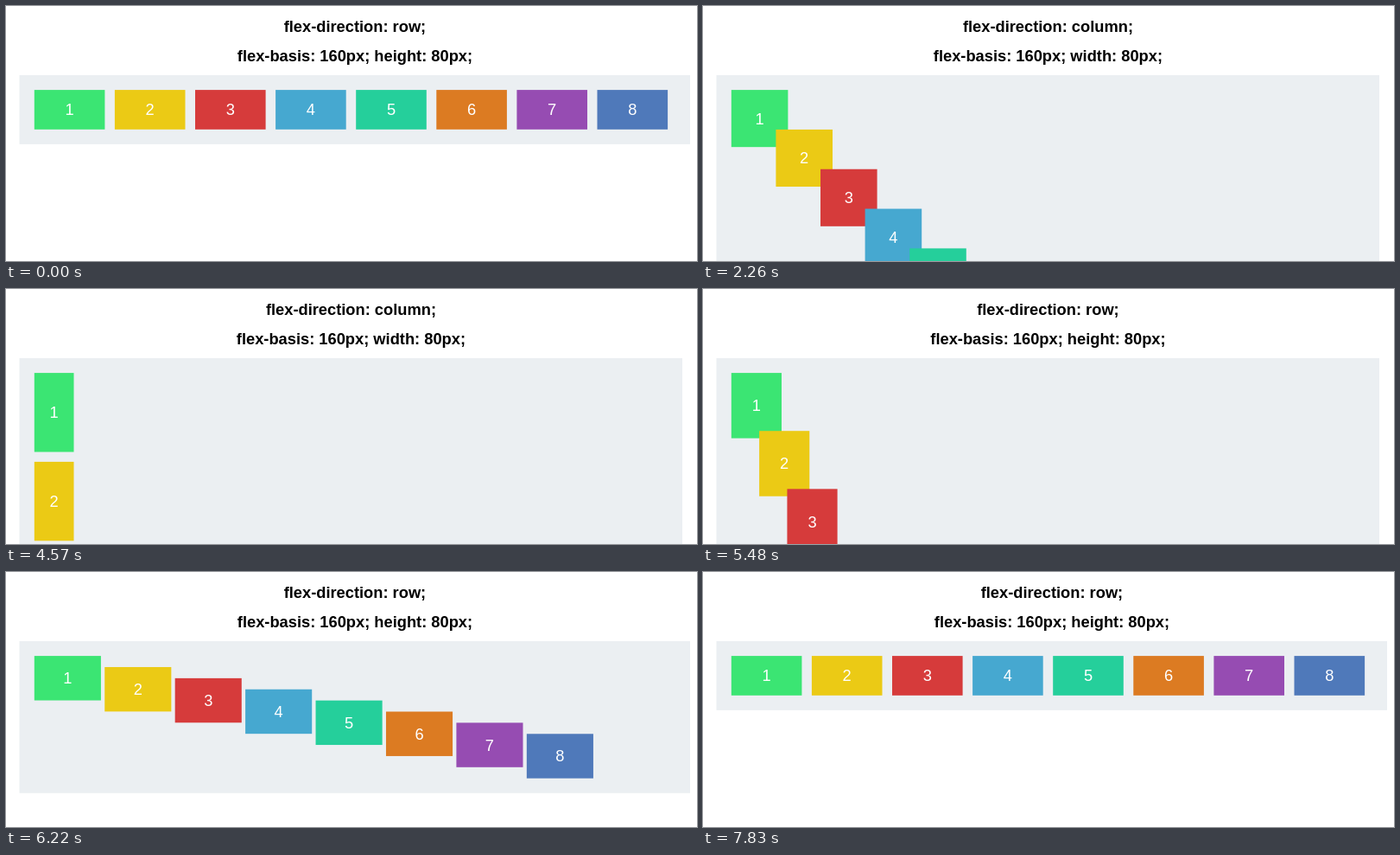
These frames come from a looping animation (800x295 px, 7.88 s). An HTML page:

```html
<!DOCTYPE html>
<html lang="en">
<head>
<meta charset="utf-8">
<title>Flex direction</title>
<style>
  html, body { margin: 0; width: 100%; height: 100%; overflow: hidden; background: #fff; }
  svg { display: block; }
  text { font: 18.3px "Liberation Sans", Arial, sans-serif; text-anchor: middle; fill: #fff; }
  .title { font-weight: bold; fill: #000; }
</style>
</head>
<body>
<svg id="stage" width="800" height="295" viewBox="0 0 800 295"></svg>
<script>
const LOOP = 7880;
const COLORS = ['#3be573', '#ebca15', '#d63b3b', '#46a8d0', '#25cf9b', '#dc7b22', '#964cb2', '#4f79ba'];
const TO_COLUMN = { start: 1766, length: 1853 };
const TO_ROW = { start: 5026, length: 2043 };
const SCROLLBAR_GONE = 5800;
const LEFT = 15.5, TOP = 80, PAD = 17.1;
const ROW = { w: 81.6, h: 45.7, step: 93.1 };
const COLUMN = { w: 45.7, h: 91.4, step: 102.8 };

const stage = document.getElementById('stage');

function add(tag, attrs) {
  const el = document.createElementNS('http://www.w3.org/2000/svg', tag);
  set(el, attrs);
  stage.append(el);
  return el;
}

function set(el, attrs) {
  for (const key in attrs) el.setAttribute(key, attrs[key]);
}

const panel = add('rect', { x: LEFT, y: TOP, fill: '#ebeff2' });
const titles = [30, 64].map(y => add('text', { y, class: 'title' }));
const boxes = COLORS.map((fill, i) => {
  const rect = add('rect', { fill });
  const label = add('text', {});
  label.textContent = i + 1;
  return { rect, label };
});

const mix = (a, b, p) => a + (b - a) * p;

// CSS "ease": cubic-bezier(.25, .1, .25, 1), solved by bisection
function ease(x) {
  if (x <= 0) return 0;
  if (x >= 1) return 1;
  const curve = (s, a, b) => 3 * a * s * (1 - s) ** 2 + 3 * b * s * s * (1 - s) + s ** 3;
  let low = 0, high = 1;
  for (let i = 0; i < 24; i++) {
    const mid = (low + high) / 2;
    if (curve(mid, .25, .25) < x) low = mid; else high = mid;
  }
  return curve(low, .1, 1);
}

const progress = (t, move) => ease((t - move.start) / move.length);

function draw(t) {
  const p = progress(t, TO_COLUMN) - progress(t, TO_ROW);
  const column = t >= TO_COLUMN.start && t < TO_ROW.start;
  const scrollbar = t >= TO_COLUMN.start && t < SCROLLBAR_GONE;
  const w = mix(ROW.w, COLUMN.w, p);
  const h = mix(ROW.h, COLUMN.h, p);
  const dx = ROW.step * (1 - p);
  const dy = COLUMN.step * p;

  const right = scrollbar ? 783 : 792;
  set(panel, { width: right - LEFT, height: 2 * PAD + 7 * dy + h });
  titles[0].textContent = `flex-direction: ${column ? 'column' : 'row'};`;
  titles[1].textContent = `flex-basis: 160px; ${column ? 'width' : 'height'}: 80px;`;
  for (const title of titles) set(title, { x: (LEFT + right) / 2 + .2 });

  boxes.forEach(({ rect, label }, i) => {
    const x = LEFT + PAD + .2 + i * dx;
    const y = TOP + PAD + i * dy;
    set(rect, { x, y, width: w, height: h });
    set(label, { x: x + w / 2, y: y + h / 2 + 6.5 });
  });
}

const begin = performance.now();
function tick() {
  draw((performance.now() - begin) % LOOP);
  requestAnimationFrame(tick);
}
tick();
</script>
</body>
</html>
```
